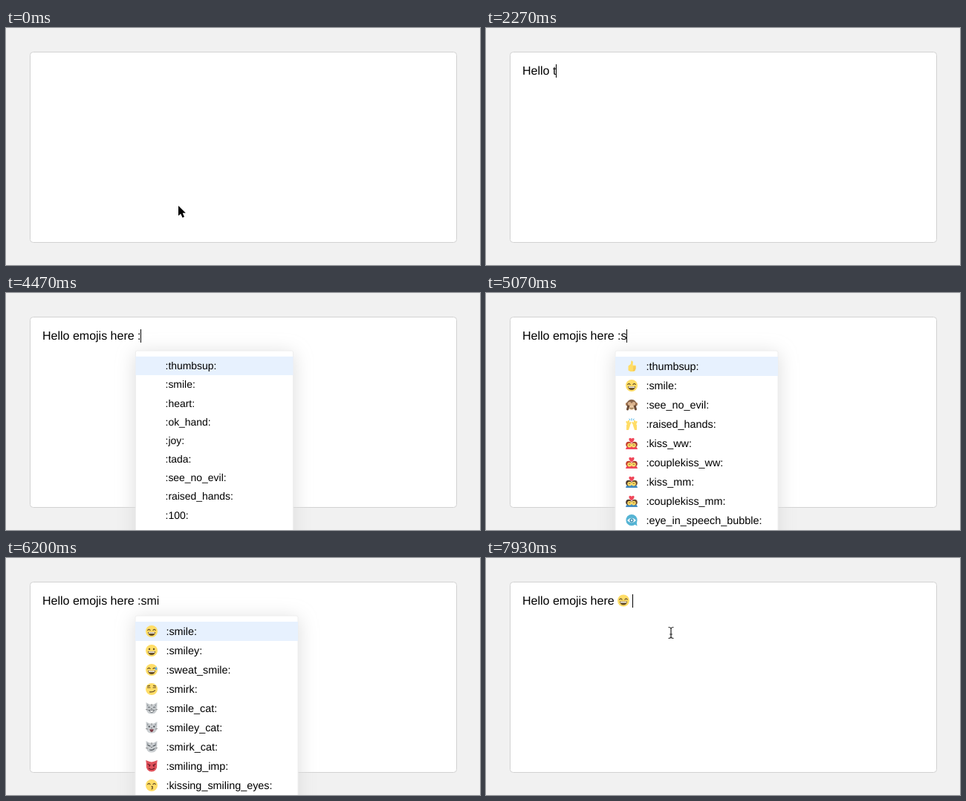
Write an HTML page that moves like this. It is 638x320 px and loops after 8000 ms.

```html
<!DOCTYPE html>
<html lang="en">
<head>
<meta charset="utf-8">
<title>Emoji suggestions</title>
<style>
  html, body { margin: 0; width: 100%; height: 100%; overflow: hidden; background: #f1f1f1; }
  svg { display: block; width: 638px; height: 320px; }
  text { font-family: "Liberation Sans", Helvetica, Arial, sans-serif; white-space: pre; text-rendering: geometricPrecision; }
</style>
</head>
<body>
<svg viewBox="0 0 638 320">
  <defs>
    <filter id="shadow" x="-40%" y="-40%" width="180%" height="180%">
      <feDropShadow dx="0" dy="4" stdDeviation="13" flood-color="#dcdcdc"/>
    </filter>
  </defs>
  <rect width="638" height="320" fill="#f1f1f1"/>
  <rect x="32.5" y="32.5" width="574" height="257" rx="4" fill="#fff" stroke="#d2d2d2"/>
  <text id="line" x="49" y="63" font-size="16"></text>
  <g id="picked" transform="translate(185 57.5)"></g>
  <rect id="caret" y="49" width="1" height="18"/>
  <g id="popup">
    <rect x="174" y="78" width="219" height="285" rx="2" fill="#fff" stroke="#eee" filter="url(#shadow)"/>
    <rect id="hover" x="174" width="219" height="26" fill="#e7f1fe"/>
    <g id="rows"></g>
  </g>
  <g id="pointer">
    <path id="arrow" d="M0 0V13.6L3.2 10.7L5.5 16L8 15L5.7 9.8H9.8Z" stroke="#fff" stroke-width="1.2" paint-order="stroke"/>
    <g id="hand" fill="#fff" stroke="#111" stroke-width="1.1" stroke-linejoin="round" stroke-linecap="round">
      <path d="M-1.4 .8Q0-1 1.3.8V6Q2.6 4.6 4 6Q5.3 5 6.5 6.7Q8.6 6 8.8 8.2V11Q8.8 13 7.4 15.3H.2Q-.5 13.5-3.8 9.5Q-4.4 7.3-2.4 7.8L-1.2 9Z"/>
      <path d="M2 10.5V13M4 10.5V13M6 10.5V13" stroke-width=".8"/>
    </g>
    <path id="beam" d="M-3.5-7.5Q-.3-7.5 0-5.5Q.3-7.5 3.5-7.5M0-5.5V5.5M-3.5 7.5Q-.3 7.5 0 5.5Q.3 7.5 3.5 7.5M-1.8 2H1.8" fill="none" stroke="#222" stroke-width="1.2"/>
  </g>
</svg>
<script>
const LOOP = 8000, OPEN = 4387, PICK = 7600, ROW = 26, TOP = 86;
const $ = id => document.getElementById(id);
const show = (id, on) => $(id).setAttribute('display', on ? 'inline' : 'none');

// Icons, drawn around 0,0 with a radius of 8
const shape = (d, fill) => `<path d="${d}" fill="${fill}"/>`;
const stroke = (d, color = '#664e27', w = 1.2) =>
  `<path d="${d}" fill="none" stroke="${color}" stroke-width="${w}" stroke-linecap="round"/>`;
const disc = (x, y, r, fill) => `<circle cx="${x}" cy="${y}" r="${r}" fill="${fill}"/>`;
const YELLOW = '#ffdd67', DARK = '#664e27', RED = '#f0475a';

const face = inner => disc(0, 0, 8, YELLOW) + inner;
const eyes = (y = -2) => disc(-3, y, 1.2, DARK) + disc(3, y, 1.2, DARK);
const arcs = stroke('M-5.3-1.4Q-3.6-4-1.9-1.4M1.9-1.4Q3.6-4 5.3-1.4');
const grin = shape('M-5 1H5Q4.4 6 0 6T-5 1Z', DARK) + shape('M-4 1.4H4V2.9H-4Z', '#fff');
const tear = (x, y) => shape(`M${x} ${y}q3 4 0 5q-3-1 0-5Z`, '#65b1ef');
const heart = (y, s) =>
  `<g transform="translate(0 ${y}) scale(${s})">${shape('M0 6.5C-11-1-6-9 0-3.5C6-9 11-1 0 6.5Z', RED)}</g>`;
const couple = (left, right, clothes) =>
  shape('M-8 8Q-7 3.5-3.5 4H3.5Q7 3.5 8 8Z', clothes) +
  disc(-4, 1.6, 3.8, left) + disc(4, 1.6, 3.8, right) +
  disc(-2.8, 2.6, 2.9, YELLOW) + disc(2.8, 2.6, 2.9, YELLOW) +
  stroke('M-3.6 2.2H-2M2 2.2H3.6', DARK, .8) + heart(-4.4, .55);
const cat = inner =>
  shape('M-7.5-8L-2.8-5.5H2.8L7.5-8L7.2 2Q6 7.5 0 7.5T-7.2 2Z', '#c9cdd0') +
  shape('M-6.3-5.8L-4-4.6L-5.9-2ZM6.3-5.8L4-4.6L5.9-2Z', '#9aa0a5') +
  shape('M-1.1 0H1.1L0 1.3Z', '#555') + stroke('M0-5.5V-3.6M-7.5 1.5L-5 2M7.5 1.5L5 2', '#777', .8) + inner;
const women = couple('#c5422f', '#a83c2f', '#f0475a');
const men = couple('#4d3a2c', '#6a4a2d', '#428bc1');
const slant = '#454b50';

const icons = {
  thumbsup: shape('M-4.5-.5L-1.2-3L-.6-7.5Q2-8 1.9-4.5L1.5-1.5H5.2Q6.5-.5 5.7 1Q6.5 2.2 5.4 3.2Q5.8 4.6 4.6 5.2Q4.5 7 2.8 7H-1.5L-4.5 5.5Z', YELLOW) +
    stroke('M2.5 1H5M2.5 3.2H5M2.2 5.2H4.4', '#e8ae3d', .8),
  smile: face(arcs + grin),
  heart: heart(1, 1.05),
  ok_hand: stroke('M-1 0L-3-6M1-1L1-7M3 0L5-6', YELLOW, 2.4) + disc(0, 3, 4.5, YELLOW) + disc(-2, 2, 1.8, '#fff'),
  joy: face(arcs + grin + tear(-6.5, 0) + tear(6.5, 0)),
  tada: shape('M-7 7L-2.5-3L3.5 3Z', '#ffc34f') + stroke('M0-2Q3-4 1-7M3 1Q5-2 7-1', RED, 1.4) +
    disc(5, -5, 1.2, '#42ade2') + disc(-4, -5, 1, '#83bf4f') + disc(6, 4, 1, '#42ade2'),
  see_no_evil: disc(-6, -1, 2.2, '#b5835a') + disc(6, -1, 2.2, '#b5835a') + disc(0, -.5, 6.8, '#89664c') +
    disc(0, 2.5, 4.6, '#e8c6a1') + stroke('M-2 4.5Q0 5.6 2 4.5', DARK, .9) +
    stroke('M-5.5 6L-3.4-1.3M5.5 6L3.4-1.3', '#6b4c37', 3) + disc(-2.7, -1.5, 2.5, '#d9b18b') + disc(2.7, -1.5, 2.5, '#d9b18b'),
  raised_hands: stroke('M-6 6L-4.5 1L-6.5-3M-4.5 0L-4-4M-3.5 1.5L-1.5-2M6 6L4.5 1L6.5-3M4.5 0L4-4M3.5 1.5L1.5-2', YELLOW, 2.3) +
    shape('M-7 1Q-4-2-2 2L-4 8H-7ZM7 1Q4-2 2 2L4 8H7Z', YELLOW) +
    stroke('M0-7.5V-5M-3-7L-2.4-5.4M3-7L2.4-5.4', '#42ade2', .9),
  100: stroke('M-6-4L-4.5-5.5V2M3.5 4H-5M-3 7H3', RED, 1.5) + stroke('M-1.5-1.5a1.6 3 0 1 0 3.2 0a1.6 3 0 1 0-3.2 0M3.6-2a1.6 3 0 1 0 3.2 0a1.6 3 0 1 0-3.2 0', RED, 1.4),
  kiss_ww: women, couplekiss_ww: women, kiss_mm: men, couplekiss_mm: men,
  eye_in_speech_bubble: disc(0, -.3, 7.6, '#55b4d4') + shape('M3 5L7.5 7.5L6.5 2Z', '#55b4d4') +
    shape('M-6 0Q0-6.5 6 0Q0 6.5-6 0Z', '#fff') + disc(0, 0, 2.7, '#3b90b5') + disc(0, 0, 1.2, '#fff'),
  smiley: face(eyes() + grin),
  sweat_smile: face(arcs + grin + tear(6, -4.5)),
  smirk: face(stroke('M-5.5-2H-2M2-2H5.5M-5.3-4.2L-2.5-4.6M2.5-4.6L5.3-4.2M-2.5 3.8Q2 4.5 4.5 1.8')),
  smile_cat: cat(stroke('M-4.8-1Q-3.5-3-2.2-1M2.2-1Q3.5-3 4.8-1', slant, 1) + shape('M-3.5 2.4H3.5Q2.5 5.5 0 5.5T-3.5 2.4Z', '#fff') + stroke('M-3.5 2.4H3.5Q2.5 5.5 0 5.5T-3.5 2.4Z', slant, .8)),
  smiley_cat: cat(disc(-3.3, -1.3, 1.1, slant) + disc(3.3, -1.3, 1.1, slant) + shape('M-2.8 2.3H2.8Q2 6 0 6T-2.8 2.3Z', '#7d3d48')),
  smirk_cat: cat(stroke('M-5-2.3L-2-1M5-2.3L2-1M-2.5 4Q1 5 3.5 2.6', slant, 1.2)),
  smiling_imp: shape('M-7.8-8Q-2.5-6 0-5.5Q2.5-6 7.8-8Q7-4 7.2-1A7.3 7.3 0 1 1-7.2-1Q-7-4-7.8-8Z', '#e0525c') +
    stroke('M-5-2.8L-2-1.2M5-2.8L2-1.2M-3.7 3Q0 6 3.7 3', '#6b1b26') + disc(-3, -.2, 1, '#6b1b26') + disc(3, -.2, 1, '#6b1b26'),
  kissing_smiling_eyes: face(arcs + stroke('M0 1.3Q2.4 1.7.8 3Q2.5 4.2 0 5'))
};

const lists = {
  '': 'thumbsup smile heart ok_hand joy tada see_no_evil raised_hands 100',
  s: 'thumbsup smile see_no_evil raised_hands kiss_ww couplekiss_ww kiss_mm couplekiss_mm eye_in_speech_bubble',
  sm: 'smile smiley sweat_smile smirk smile_cat smiley_cat smirk_cat smiling_imp kissing_smiling_eyes'
};

// Typing: '<' is a backspace
const keys = 'Hello th<<emojis here :smi';
const keyTimes = [1270, 1400, 1530, 1600, 1730, 1870, 2270, 2330, 2530, 2670, 2730, 2800, 2870,
  3070, 3130, 3400, 3470, 3730, 3800, 3870, 3930, 4070, OPEN, 5000, 5270, 5370];

// Pointer stops: time, x, y
const stops = [[0, 232, 240], [60, 232, 240], [270, 219, 140], [520, 219, 140], [700, 205, 102],
  [6240, 205, 102], [6660, 248, 210], [6880, 262, 190], [7160, 254, 150], [7390, 249, 116],
  [7440, 249, 116], [7560, 249, 101], [LOOP, 249, 101]];

const ctx = document.createElement('canvas').getContext('2d');
ctx.font = '16px "Liberation Sans", Helvetica, Arial, sans-serif';

function typed(t) {
  let text = '', last = 700;
  keyTimes.forEach((at, i) => {
    if (t < at) return;
    text = keys[i] === '<' ? text.slice(0, -1) : text + keys[i];
    last = at;
  });
  return { text, last };
}

function pointerAt(t) {
  const i = Math.max(1, stops.findIndex(s => s[0] > t));
  const [a, b] = [stops[i - 1], stops[i]];
  const k = (t - a[0]) / (b[0] - a[0]), e = k * k * (3 - 2 * k);
  return { x: a[1] + (b[1] - a[1]) * e, y: a[2] + (b[2] - a[2]) * e };
}

function bezier(k, x1, y1, x2, y2) {
  if (k <= 0 || k >= 1) return k <= 0 ? 0 : 1;
  const at = (u, a, b) => 3 * (1 - u) ** 2 * u * a + 3 * (1 - u) * u * u * b + u ** 3;
  let lo = 0, hi = 1;
  for (let i = 0; i < 24; i++) {
    const mid = (lo + hi) / 2;
    if (at(mid, x1, x2) < k) lo = mid; else hi = mid;
  }
  return at(lo, y1, y2);
}

const popupScale = t => t < PICK
  ? bezier((t - OPEN) / 250, .3, 1.2, .2, 1)
  : 1 - bezier((t - PICK) / 250, .3, 1, .2, 1);

let shownList = null;
function fillRows(query) {
  if (query === shownList) return;
  shownList = query;
  $('rows').innerHTML = lists[query].split(' ').map((name, i) =>
    `<g transform="translate(0 ${TOP + ROW * (i + .5)})"><g class="icon" transform="translate(196 0)">${icons[name]}</g>` +
    `<text x="215.4" y="5" font-size="14.4">:${name}:</text></g>`).join('');
}

function draw(t) {
  const picked = t >= PICK;
  let { text, last } = typed(t);
  const query = text.includes(':') ? text.split(':')[1].slice(0, 2) : '';
  if (picked) {
    text = text.split(':')[0];
    last = PICK;
  }
  $('line').textContent = text;
  show('picked', picked);
  const end = 49 + ctx.measureText(text).width + (picked ? 20.45 : 0);
  $('caret').setAttribute('x', Math.floor(end));
  show('caret', t >= 700 && Math.floor((t - last) / 500) % 2 === 0);

  const scale = popupScale(t), { x, y } = pointerAt(t);
  show('popup', scale > .004);
  if (scale > .004) {
    fillRows(query);
    $('popup').setAttribute('transform', `translate(188 78) scale(${scale}) translate(-188 -78)`);
    document.querySelectorAll('.icon').forEach((icon, i) =>
      icon.setAttribute('opacity', query || t > 4560 + i * 40 ? 1 : 0));
    const row = t > 6240 ? Math.floor((y - TOP) / ROW) : 0;
    $('hover').setAttribute('y', TOP + ROW * row);
  }

  const overList = t > 6240 && t < PICK + 60;
  show('pointer', t < 1270 || t > 6240);
  show('arrow', y > 189 && !overList);
  show('hand', overList);
  show('beam', y <= 189 && !overList);
  $('pointer').setAttribute('transform', `translate(${x} ${y})`);
}

$('picked').innerHTML = icons.smile;
const start = performance.now();
function tick() {
  draw((performance.now() - start) % LOOP);
  requestAnimationFrame(tick);
}
tick();
</script>
</body>
</html>
```
